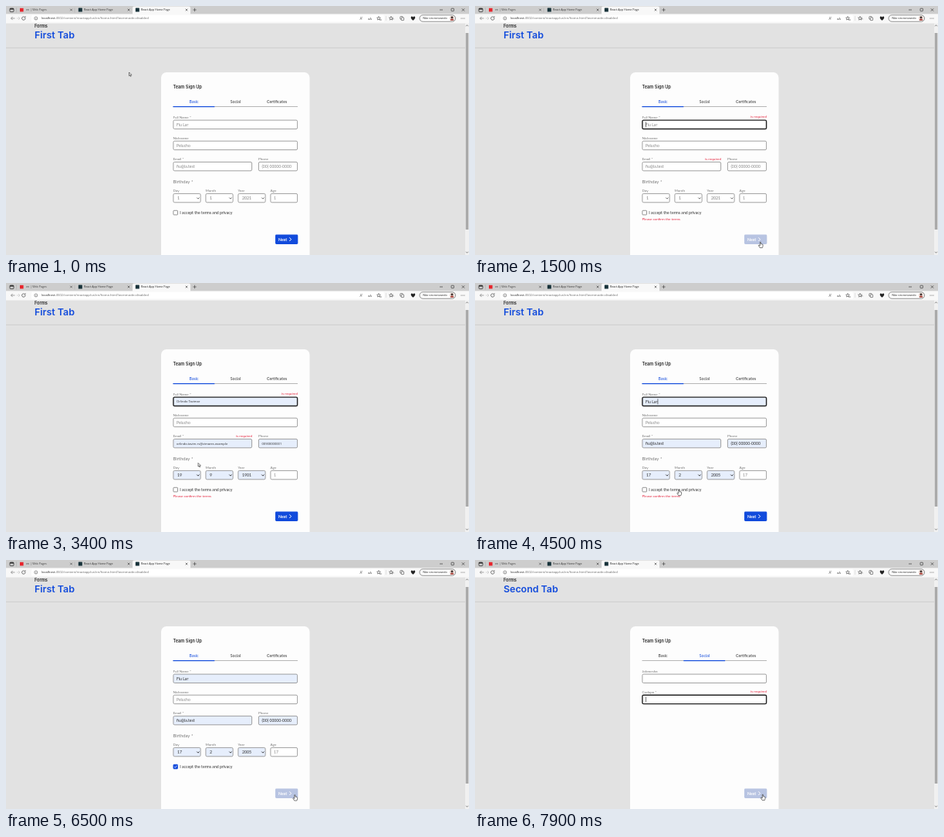
Animation of 600x323 px, one loop 8 s. Source, as an HTML page with a canvas:

```html
<!DOCTYPE html>
<html lang="en">
<head>
<meta charset="utf-8">
<title>Team Sign Up</title>
<style>
html, body { margin: 0; width: 100%; height: 100%; overflow: hidden; background: #e2e2e2; }
canvas { display: block; width: 600px; height: 323px; }
</style>
</head>
<body>
<canvas id="stage"></canvas>
<script>
const W = 600, H = 323, LOOP = 8000, STEP = 100;
const UI = '"Open Sans", "Noto Sans", sans-serif';
const FORM = 'Lato, "Open Sans", sans-serif';
const HEAD = 'Inter, Roboto, sans-serif';
const BLUE = '#124bdc', PALE = '#b8c4e2', GREY = '#777', DARK = '#2b2b2b', RED = '#e5233d', FILL = '#e6eefc';

const canvas = document.getElementById('stage');
const dpr = Math.max(1, window.devicePixelRatio || 1);
canvas.width = W * dpr;
canvas.height = H * dpr;
const c = canvas.getContext('2d');

// Moments of the story, in ms
const T = { click: 1200, preview: 2900, fill: 4200, check: 4900, next: 6700, again: 7400 };

// Pointer path: time, x, y
const PATH = [
  [0, 159.5, 86], [300, 159.5, 86], [800, 358, 298], [1100, 370, 306], [1500, 370, 306],
  [1700, 369, 303], [2200, 300, 156], [2500, 262, 155], [2900, 250, 176], [3400, 249, 233.5],
  [3800, 252, 252], [4200, 258, 262], [4500, 264.5, 268], [4900, 264.5, 268],
  [5200, 244, 274], [5600, 241.5, 275.5], [5800, 243, 277], [6300, 371, 305],
  [6500, 374.5, 304.5], [7300, 373, 304], [8000, 373, 304]
];

const VALUES = {
  empty: { name: 'Fiu Lar', mail: 'fiu@la.test', phone: '(00) 00000-0000', date: ['1', '1', '2021'], age: '1' },
  hover: { name: 'Orlindo Tavimar', mail: 'orlindo.tavim.rs@vimares.example', phone: '00900000001', date: ['19', '9', '1901'], age: '1' },
  done: { name: 'Fiu Lar', mail: 'fiu@la.test', phone: '(00) 00000-0000', date: ['17', '2', '2005'], age: '17' }
};

function pointer(t) {
  let i = 0;
  while (i < PATH.length - 2 && t >= PATH[i + 1][0]) i++;
  const [t0, x0, y0] = PATH[i], [t1, x1, y1] = PATH[i + 1];
  const k = (t - t0) / (t1 - t0), e = k * k * (3 - 2 * k);
  return { x: x0 + (x1 - x0) * e, y: y0 + (y1 - y0) * e };
}

function rect(x, y, w, h, fill) {
  c.fillStyle = fill;
  c.fillRect(x, y, w, h);
}

function roundPath(x, y, w, h, r) {
  c.beginPath();
  c.moveTo(x + r, y);
  c.arcTo(x + w, y, x + w, y + h, r);
  c.arcTo(x + w, y + h, x, y + h, r);
  c.arcTo(x, y + h, x, y, r);
  c.arcTo(x, y, x + w, y, r);
  c.closePath();
}

function box(x, y, w, h, r, fill, stroke, width = 0.7) {
  roundPath(x, y, w, h, r);
  if (fill) { c.fillStyle = fill; c.fill(); }
  if (stroke) { c.strokeStyle = stroke; c.lineWidth = width; c.stroke(); }
}

function line(points, color, width = 0.6) {
  c.beginPath();
  for (let i = 0; i < points.length; i += 2) c.lineTo(points[i], points[i + 1]);
  c.strokeStyle = color;
  c.lineWidth = width;
  c.stroke();
}

function dot(x, y, r, fill, stroke) {
  c.beginPath();
  c.arc(x, y, r, 0, 7);
  if (fill) { c.fillStyle = fill; c.fill(); }
  if (stroke) { c.strokeStyle = stroke; c.lineWidth = 0.6; c.stroke(); }
}

function text(s, x, y, size, color, font = FORM, weight = 400, align = 'left') {
  c.font = `${weight} ${size}px ${font}`;
  c.textAlign = align;
  c.fillStyle = color;
  c.fillText(s, x, y);
  return c.measureText(s).width;
}

function cross(x, y, r, color) {
  line([x - r, y - r, x + r, y + r], color, 0.6);
  line([x - r, y + r, x + r, y - r], color, 0.6);
}

function star(x, y, r) {
  const p = [];
  for (let i = 0; i <= 10; i++) {
    const a = i * Math.PI / 5 - Math.PI / 2, q = i % 2 ? r * 0.45 : r;
    p.push(x + q * Math.cos(a), y + q * Math.sin(a));
  }
  line(p, '#444', 0.6);
}

function browserTabs() {
  rect(0, 0, W, 11, '#cdcdcd');
  box(5, 3, 5, 4.6, 1, null, '#333', 0.8);
  rect(5, 3, 5, 1.6, '#333');
  line([13.5, 2, 13.5, 8.5], '#aaa', 0.5);
  line([89, 2.5, 89, 8.5], '#aaa', 0.5);
  roundPath(164, 0.6, 75, 14, 2);
  c.fillStyle = '#f8f8f8';
  c.fill();
  rect(18, 2.8, 4.6, 4.6, '#e8242c');
  box(93.8, 2.6, 5, 5, 0.4, '#17323a');
  box(167.8, 2.6, 5, 5, 0.4, '#17323a');
  text('en | Web Pages', 26, 6.4, 3.65, '#444', UI);
  text('React App Home Page', 101, 6.4, 3.65, '#333', UI);
  text('React App Home Page', 175, 6.4, 3.65, '#222', UI);
  for (const x of [84.5, 159, 234]) cross(x, 5, 1.3, '#333');
  line([242.3, 5, 246.7, 5], '#333');
  line([244.5, 2.8, 244.5, 7.2], '#333');
  line([562, 5, 566, 5], '#222');
  box(577, 3.2, 3.4, 3.4, 0.5, null, '#222', 0.6);
  cross(592.5, 5, 1.7, '#222');
}

function toolbar() {
  rect(0, 10.3, W, 12.2, '#f8f8f8');
  line([11.5, 16, 6.5, 16], '#666');
  line([8.6, 13.9, 6.5, 16, 8.6, 18.1], '#666');
  line([13.8, 16, 18, 16], '#c4c4c4');
  line([16, 14, 18, 16, 16, 18], '#c4c4c4');
  c.beginPath();
  c.arc(22.8, 16, 2.2, -0.3, 5);
  c.strokeStyle = '#444';
  c.lineWidth = 0.7;
  c.stroke();
  line([23.2, 14.6, 25, 14.8, 25, 13], '#444');
  box(33, 11.8, 457, 8.6, 1.5, '#fff');
  dot(38.8, 16, 2, null, '#555');
  line([38.8, 15.6, 38.8, 17.2], '#555', 0.5);
  const host = text('localhost', 46, 17.4, 4.15, '#222', UI);
  text(':4502/content/reactapp/us/en/home.html?wcmmode=disabled', 46 + host, 17.4, 4.15, '#666', UI);
  text('A\u207E', 458.5, 17.6, 4.4, '#555', UI);
  text('aA', 469, 17.6, 4.2, '#555', UI);
  star(483, 16, 2.5);
  line([484.2, 18, 487, 18], '#444');
  line([492.5, 13, 492.5, 19], '#ccc', 0.5);
  star(499, 16, 2.6);
  line([500.3, 16.8, 502.6, 16.8], '#444');
  box(510.8, 13.6, 3.4, 3.6, 0.6, null, '#444', 0.6);
  box(512.2, 15, 3.4, 3.6, 0.6, '#f8f8f8', '#444', 0.6);
  c.beginPath();
  c.moveTo(527.5, 18.7);
  c.bezierCurveTo(522.6, 15.6, 525.4, 11.8, 527.5, 14.4);
  c.bezierCurveTo(529.6, 11.8, 532.4, 15.6, 527.5, 18.7);
  c.fillStyle = '#222';
  c.fill();
  box(536, 11.8, 46.5, 8.4, 4.2, '#fff', '#444', 0.6);
  text('Não sincronizando', 540.3, 17.3, 3.6, '#222', UI);
  dot(578, 16, 3.2, '#e9d9d2');
  dot(578, 14.9, 1.4, '#3a2d2b');
  c.beginPath();
  c.arc(578, 18.8, 2.2, Math.PI, 0);
  c.fillStyle = '#a8403a';
  c.fill();
  for (const x of [590, 592, 594]) dot(x, 16, 0.5, '#444');
}

function page(second) {
  rect(0, 22, W, H - 22, '#e2e2e2');
  text('Forms', 37, 28.4, 5.6, '#222', HEAD, 600);
  text(second ? 'Second Tab' : 'First Tab', 37, 41.9, 12.4, BLUE, HEAD, 600);
  rect(0, 53.8, 595, 0.8, '#c8c8c8');
  rect(595, 22, 5, H - 22, '#f0f0f0');
  rect(595.7, 35, 3.6, 255, '#a9a9a9');
  line([596, 26.2, 597.5, 24.7, 599, 26.2], '#555', 0.7);
  line([596, 318.8, 597.5, 320.3, 599, 318.8], '#555', 0.7);
  box(201, 86, 192.5, 250, 7, '#fdfdfd');
  text('Team Sign Up', 216.5, 106.5, 5.6, '#222', HEAD, 600);
  rect(216.5, 130.2, 161.5, 0.8, '#a5a5a5');
  ['Basic', 'Social', 'Certificates'].forEach((s, i) => {
    const on = i === (second ? 1 : 0);
    text(s, 243.5 + i * 53.8, 125.6, 5.2, on ? BLUE : '#333', FORM, 400, 'center');
    if (on) rect(216.5 + i * 53.8, 130, 53.8, 1.2, BLUE);
  });
}

function label(s, x, y) { text(s, x, y, 4.6, GREY); }

function error(s, x, y, align = 'right') { text(s, x, y, 4.55, RED, FORM, 400, align); }

// Draws an input and returns the x of the end of its text
function field(x, y, w, value, o = {}) {
  box(x + 0.4, y + 0.4, w - 0.8, 11.4, 1.6, o.filled ? FILL : '#fff', o.focus ? '#222' : '#8a8a8a', o.focus ? 1.4 : 0.8);
  const size = o.small ? 4.1 : 5.1;
  return x + 4.5 + text(value, x + 4.5, y + (o.small ? 7.5 : 7.9), size, o.filled ? DARK : '#858585', o.small ? UI : FORM);
}

function select(x, value, filled) {
  box(x + 0.4, 243.4, 35.2, 11.4, 1.6, filled ? FILL : '#fff', '#8a8a8a', 0.8);
  text(value, x + 5.5, 250.9, 5.2, filled ? DARK : GREY);
  line([x + 30.8, 248.6, x + 32.4, 250.2, x + 34, 248.6], filled ? '#222' : '#555', 0.9);
}

function caret(x, y, age) {
  if (age >= 0 && age % 1060 < 530) rect(x, y + 2.6, 0.6, 7, '#222');
}

function basicForm(t) {
  const state = t < T.preview ? 'empty' : t < T.fill ? 'hover' : 'done';
  const v = VALUES[state], filled = state !== 'empty', small = state === 'hover';
  const focus = t >= T.click && t < T.check;
  const missing = t >= T.click && t < T.fill;

  label('Full Name *', 216.5, 145.6);
  const end = field(216.5, 147.7, 161.5, v.name, { filled, small, focus });
  if (focus && !small) caret(filled ? end + 0.4 : 221, 147.7, t - (filled ? T.fill : T.click));
  label('Nickname', 216.5, 172.7);
  field(216.5, 174.8, 161.5, 'Pelucho');
  label('Email *', 216.5, 199.9);
  field(216.5, 202, 102.5, v.mail, { filled, small });
  label('Phone', 327, 199.9);
  field(327, 202, 51, v.phone, { filled, small });
  if (missing) {
    error('is required', 378, 145.2);
    error('is required', 319, 199.5);
  }

  text('Birthday *', 216.5, 229.6, 5.9, GREY);
  ['Day', 'Month', 'Year', 'Age'].forEach((s, i) => label(s, 216.5 + i * 42, 241));
  v.date.forEach((s, i) => select(216.5 + i * 42, s, filled));
  field(342.5, 243, 35.5, v.age);

  const checked = t >= T.check;
  box(216.9, 265.3, 5.6, 5.6, 0.8, checked ? BLUE : '#fff', checked ? BLUE : '#666', 0.7);
  if (checked) line([218.1, 268.2, 219.3, 269.4, 221.4, 266.8], '#fff', 0.8);
  text('I accept the terms and privacy', 225.2, 269.9, 5.2, '#333');
  if (t >= T.click && !checked) error('Please confirm the terms', 216.5, 277.9, 'left');
}

function socialForm(t) {
  const focus = t >= T.again;
  label('Jobmesha', 216.5, 145.6);
  field(216.5, 147.7, 161.5, '');
  label('Codupa *', 216.5, 172.7);
  field(216.5, 174.8, 161.5, '', { focus });
  if (focus) {
    error('is required', 378, 172.3);
    caret(221, 174.8, t - T.again);
  }
}

function nextButton(hover) {
  box(349, 296.5, 29.3, 12.4, 1.4, hover ? PALE : BLUE);
  text('Next', 353, 304.5, 5.2, '#fff', FORM, 700);
  line([367.3, 300.4, 369.6, 302.7, 367.3, 305], '#fff', 1);
}

function shape(x, y, points) {
  c.beginPath();
  for (let i = 0; i < points.length; i += 2) c.lineTo(x + points[i], y + points[i + 1]);
  c.closePath();
  c.fillStyle = '#fff';
  c.fill();
  c.strokeStyle = '#222';
  c.lineWidth = 0.6;
  c.lineJoin = 'round';
  c.stroke();
}

function cursor(x, y, kind) {
  if (kind === 'hand') {
    shape(x, y, [-0.7, 0.3, 0.3, 0.3, 0.5, 2.6, 2.6, 3, 3.2, 4, 2.8, 6.6, 2.4, 7.6, -0.8, 7.6, -2.7, 4.6, -2, 4, -0.7, 5]);
  } else if (kind === 'beam') {
    line([x, y - 2.8, x, y + 2.8], '#222');
    line([x - 0.9, y - 2.8, x + 0.9, y - 2.8], '#222');
    line([x - 0.9, y + 2.8, x + 0.9, y + 2.8], '#222');
  } else {
    shape(x, y, [0, 0, 0, 4.6, 1.1, 3.7, 1.9, 5.4, 2.6, 5.1, 1.9, 3.4, 3.3, 3.3]);
  }
}

function inside(p, x, y, w, h) {
  return p.x >= x && p.x <= x + w && p.y >= y && p.y <= y + h;
}

function draw(t) {
  c.setTransform(dpr, 0, 0, dpr, 0, 0);
  const p = pointer(t), second = t >= T.next;
  const hover = inside(p, 349, 296.5, 29.3, 12.4);
  page(second);
  if (second) socialForm(t); else basicForm(t);
  nextButton(hover);
  browserTabs();
  toolbar();
  const onLabel = !second && inside(p, 216.5, 265, 76, 6);
  const onField = !second && [147.7, 174.8, 202].some(y => inside(p, 216.5, y, 161.5, 12.2));
  cursor(p.x, p.y, hover || onLabel ? 'hand' : onField ? 'beam' : 'arrow');
}

const start = performance.now();
function tick() {
  const t = Math.max(0, performance.now() - start) % LOOP;
  draw(Math.floor(t / STEP) * STEP);
  requestAnimationFrame(tick);
}
tick();
</script>
</body>
</html>
```
